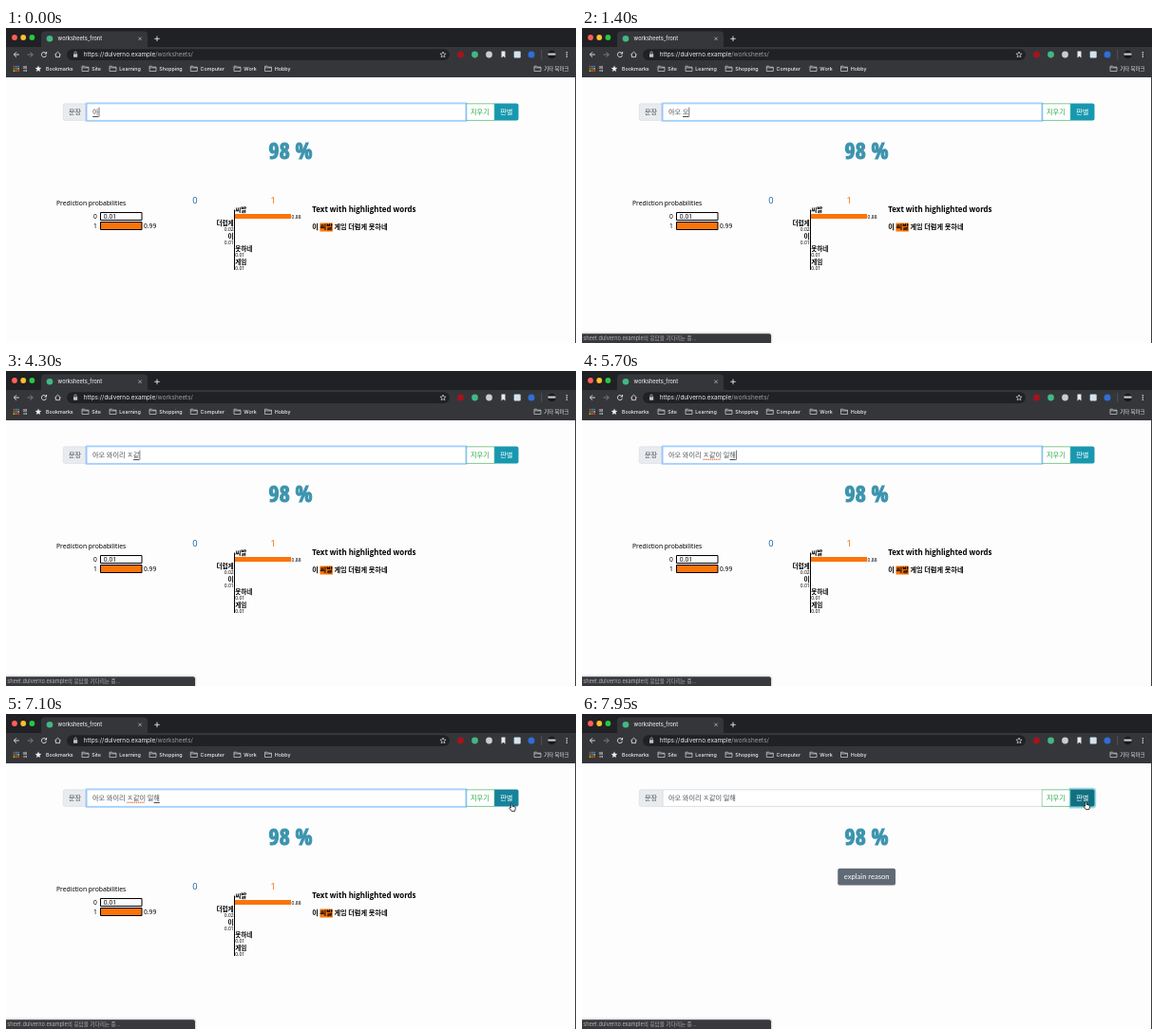
Write an HTML page with a canvas that moves like this. It is 600 px wide and 332 px high and loops after 8 s.

```html
<!DOCTYPE html>
<html lang="ko">
<head>
<meta charset="utf-8">
<title>Sentence check</title>
<style>
html, body { margin: 0; width: 100%; height: 100%; overflow: hidden; background: #fdfdfe; }
canvas { display: block; width: 600px; height: 332px; }
</style>
</head>
<body>
<canvas id="stage" width="600" height="332"></canvas>
<script>
const ctx = document.getElementById('stage').getContext('2d');
const LOOP = 8000;
const UI = "Inter, 'Noto Sans CJK KR', 'Noto Sans CJK', sans-serif";
const KO = "'Noto Sans CJK KR', 'Noto Sans CJK', 'Noto Sans', sans-serif";
const SANS = "'Noto Sans', sans-serif";
const ORANGE = '#fb7409', TEAL = '#3d94ae';

const PRESS = 7650, RESULT = 7750;
const INPUT_X = 91;
const HEAD = '아오 와이리 ';
const KEYS = [
  [0, '아'], [100, '앙'], [500, '아오'], [1100, '아오 '], [1200, '아오 ㅇ'],
  [1400, '아오 오'], [1450, '아오 와'], [1600, '아오 왕'], [1700, '아오 와이'],
  [1850, '아오 와일'], [1900, '아오 와이리'], [3050, HEAD], [3750, HEAD + 'ㅈ'],
  [4100, HEAD + 'ㅈㄱ'], [4200, HEAD + 'ㅈ가'], [4300, HEAD + 'ㅈ같'],
  [4550, HEAD + 'ㅈ같ㅇ'], [4600, HEAD + 'ㅈ같이'], [4800, HEAD + 'ㅈ같이 '],
  [4950, HEAD + 'ㅈ같이 ㅇ'], [5000, HEAD + 'ㅈ같이 이'], [5150, HEAD + 'ㅈ같이 일'],
  [5350, HEAD + 'ㅈ같이 잃'], [5600, HEAD + 'ㅈ같이 일해']
];
const SPELLCHECK = 4800;

const progress = (t, from, to) => Math.min(1, Math.max(0, (t - from) / (to - from)));
const smooth = p => p * p * (3 - 2 * p);
const lerp = (a, b, p) => a + (b - a) * p;
const mix = (a, b, p) => `rgba(${a.map((v, i) => lerp(v, b[i], p)).join()})`;

function rect(x, y, w, h, color) {
  ctx.fillStyle = color;
  ctx.fillRect(x, y, w, h);
}

function box(x, y, w, h, radii, fill, stroke, width = 0.5) {
  ctx.beginPath();
  ctx.roundRect(x, y, w, h, radii);
  if (fill) { ctx.fillStyle = fill; ctx.fill(); }
  if (stroke) { ctx.strokeStyle = stroke; ctx.lineWidth = width; ctx.stroke(); }
}

function dot(x, y, r, color) {
  ctx.beginPath();
  ctx.arc(x, y, r, 0, Math.PI * 2);
  ctx.fillStyle = color;
  ctx.fill();
}

function path(d, x, y, stroke, fill, width = 0.9) {
  const shape = new Path2D(d);
  ctx.save();
  ctx.translate(x, y);
  if (fill) { ctx.fillStyle = fill; ctx.fill(shape); }
  if (stroke) { ctx.strokeStyle = stroke; ctx.lineWidth = width; ctx.stroke(shape); }
  ctx.restore();
}

function text(str, x, y, font, color, align = 'left') {
  ctx.font = font;
  ctx.fillStyle = color;
  ctx.textAlign = align;
  ctx.fillText(str, x, y);
}

function star(x, y, r, fill, stroke) {
  ctx.beginPath();
  for (let i = 0; i < 10; i++) {
    const a = i * Math.PI / 5 - Math.PI / 2;
    const d = i % 2 ? r * 0.45 : r;
    ctx.lineTo(x + d * Math.cos(a), y + d * Math.sin(a));
  }
  ctx.closePath();
  if (fill) { ctx.fillStyle = fill; ctx.fill(); }
  if (stroke) { ctx.strokeStyle = stroke; ctx.lineWidth = 0.7; ctx.stroke(); }
}

function drawTabs() {
  rect(0, 0, 600, 21, '#202124');
  ['#ff5f57', '#febc2e', '#28c840'].forEach((c, i) => dot(9 + i * 9.2, 10, 2.9, c));
  box(37, 3.5, 112, 20, 4, '#35363a');
  dot(46, 11.2, 3.3, '#41b883');
  text('worksheets_front', 54.6, 13.3, '500 5.6px ' + UI, '#e4e6e9');
  path('M-1.7-1.7L1.7 1.7M1.7-1.7L-1.7 1.7', 141, 11.3, '#c4c7cb', null, 0.7);
  path('M-2.7 0H2.7M0-2.7V2.7', 159, 11.3, '#e8eaed');
}

function drawToolbar() {
  rect(0, 20, 600, 32, '#35363a');
  path('M2.8 0H-2.6M0-2.7L-2.7 0L0 2.7', 11, 28, '#e8eaed');
  path('M-2.8 0H2.6M0-2.7L2.7 0L0 2.7', 25.5, 28, '#85888c');
  path('M2.3-1.2A2.6 2.6 0 1 0 2.5 .8M2.6-3V-.9H.5', 40, 28, '#e8eaed');
  path('M-3.2 .2L0-2.8L3.2 .2M-2.1-.5V2.6H2.1V-.5', 54.5, 28, '#e8eaed', null, 0.8);

  box(64, 22.3, 403, 11.6, 5.8, '#202124');
  box(71, 27.2, 4.2, 3.5, 0.5, '#c0c3c7');
  path('M-1.2 0V-1.2A1.2 1.2 0 0 1 1.2-1.2V0', 73.1, 27.3, '#c0c3c7', null, 0.7);
  const font = '6.4px ' + UI;
  const host = 'https://dulverno.example';
  text(host, 81.7, 30.3, font, '#e8eaed');
  text('/worksheets/', 81.7 + ctx.measureText(host).width, 30.3, font, '#9aa0a6');
  star(460, 28.2, 3.2, null, '#d5d7da');

  dot(478.5, 28, 3.5, '#a3151c');
  dot(493.5, 28, 3.4, '#41b883');
  dot(508.5, 28, 3.4, '#c9cdd0');
  path('M-2-3.4H2V3.4L0 1.7L-2 3.4Z', 523.5, 28, null, '#e8eaed');
  box(534.7, 24.6, 7, 7, 1, '#d2e3ee');
  dot(553, 28, 3.5, '#2f6fd6');
  rect(563.5, 23, 0.6, 10, '#606266');
  dot(574.5, 28, 4.3, '#17181a');
  rect(570.5, 26.5, 8, 2.2, '#c6c7c6');
  for (let i = -1; i < 2; i++) dot(590.3, 28 + i * 2.3, 0.75, '#e8eaed');
}

function drawBookmarks() {
  const font = '500 5.35px ' + UI, ink = '#eceef0', y = 44.8;
  const colors = ['#ea4335', '#fbbc04', '#34a853', '#4285f4'];
  for (let i = 0; i < 9; i++) {
    rect(7.7 + i % 3 * 2.3, 39.8 + Math.floor(i / 3) * 2.3, 1.6, 1.6, colors[(i * 3 + (i >> 1)) % 4]);
  }
  text('앱', 17.5, y, font, ink);
  star(34, 43.1, 3.5, ink);
  text('Bookmarks', 42, y, font, ink);
  const folders = [['Site', 80], ['Learning', 109], ['Shopping', 151], ['Computer', 194.3],
    ['Work', 240], ['Hobby', 272.5], ['기타 북마크', 556]];
  for (const [label, x] of folders) {
    path('M0-2.6H2.6L3.5-1.6H7V2.7H0ZM0-.9H7', x, 42.8, '#d3d5d8', null, 0.7);
    text(label, x + 10.3, y, font, ink);
  }
}

function drawField(t) {
  const font = '7.2px ' + KO;
  const blur = progress(t, PRESS, PRESS + 150);
  const hover = progress(t, 6950, 7100);
  const base = 91.1;

  box(60.2, 79.8, 25, 17.6, [2, 0, 0, 2], '#e9ecef', '#ced4da');
  text('문장', 66, base, font, '#495057');
  box(484, 79.8, 30.2, 17.6, 0, '#fff', '#28a745', 0.6);
  text('지우기', 489, base, font, '#28a745');

  const ring = 1 - blur;
  if (ring) box(84.5, 79.2, 400, 18.8, 0.5, null, `rgba(0,123,255,${0.27 * ring})`, 2);
  box(85.1, 79.8, 398.8, 17.6, 0, '#fff', mix([206, 212, 218, 1], [128, 189, 255, 1], ring), 0.7);

  if (blur) box(514, 79, 26, 19.2, [0, 2.5, 2.5, 0], null, `rgba(58,176,195,${0.5 * blur})`, 2.4);
  const idle = [24, 152, 175, 1], dark = [21, 131, 154, 1], pressed = [16, 112, 128, 1];
  const fill = blur ? mix(dark, pressed, blur) : mix(idle, dark, hover);
  box(514.2, 79.6, 25.3, 18, [0, 2, 2, 0], fill);
  text('판별', 520.2, base, font, '#fff');

  const [keyTime, typed] = KEYS.findLast(key => key[0] <= t);
  text(typed, INPUT_X, base, font, '#495057');
  if (t >= PRESS) return;

  const widthOf = s => ctx.measureText(s).width;
  const end = INPUT_X + widthOf(typed);
  if (!typed.endsWith(' ')) {
    const start = INPUT_X + widthOf(typed.slice(0, -1));
    rect(start + 0.2, 93, end - start - 0.4, 0.9, '#33383d');
  }
  if (t >= SPELLCHECK) {
    const start = INPUT_X + widthOf(HEAD);
    for (let x = start + 0.6; x < start + 19.5; x += 1.9) dot(x, 93.3, 0.7, '#ee6b35');
  }
  if (Math.floor((t - keyTime) / 500) % 2 === 0) rect(end + 0.1, 83.6, 0.6, 10, '#202428');
}

function drawScore() {
  const fontAt = size => `800 condensed ${size}px 'Open Sans Condensed', 'Roboto Condensed', 'Open Sans', sans-serif`;
  ctx.font = fontAt(28);
  const size = Math.min(28, 28 * 46 / ctx.measureText('98 %').width);
  const baseline = 129.2 + size * 0.36;
  text('98 %', 299.6, baseline, fontAt(size), TEAL, 'center');
  ctx.strokeStyle = TEAL;
  ctx.lineWidth = 1.1;
  ctx.strokeText('98 %', 299.6, baseline);
}

function drawExplanation() {
  const ink = '#000', label = '500 6.7px ' + SANS, tiny = '5px ' + SANS, ko = '600 6.6px ' + KO;
  text('Prediction probabilities', 53, 186.7, '500 6.75px ' + SANS, ink);
  text('0', 95.8, 200.8, label, ink, 'right');
  text('1', 95.8, 211.2, label, ink, 'right');
  box(99.5, 194.5, 43.5, 8, 0, '#fafbfd', ink, 1);
  box(99.5, 204.5, 43.5, 8, 0, ORANGE, ink, 1);
  text('0.01', 102.8, 200.8, label, ink);
  text('0.99', 145, 211.2, label, ink);

  text('0', 199, 184.6, '500 9.3px ' + SANS, '#1b6cab', 'center');
  text('1', 281.2, 184.6, '500 9.3px ' + SANS, ORANGE, 'center');
  rect(240, 196, 60, 5, ORANGE);
  text('0.88', 300.6, 200.5, tiny, ink);
  rect(240, 191.5, 1, 63.5, ink);
  text('씨발', 241.2, 194.2, ko, ink);
  const words = [['더럽게', '0.02', 208, -1], ['이', '0.01', 221.6, -1],
    ['못하네', '0.01', 235.2, 1], ['게임', '0.01', 248.8, 1]];
  for (const [word, weight, y, side] of words) {
    const align = side < 0 ? 'right' : 'left';
    const x = side < 0 ? 239.6 : 241.2;
    text(word, x, y, ko, ink, align);
    text(weight, x, y + 6.2, tiny, ink, align);
  }

  text('Text with highlighted words', 322.3, 194, "700 7.9px 'Open Sans', sans-serif", ink);
  rect(330.5, 205.5, 13.4, 9, ORANGE);
  text('이 씨발 게임 더럽게 못하네', 322.3, 211.8, '600 7.2px ' + KO, ink);
}

function drawReasonButton() {
  box(269.2, 162.8, 60.8, 17.8, 2, '#606a74');
  text('explain reason', 299.7, 174.2, '7.6px Lato, sans-serif', '#fff', 'center');
}

function drawStatus(t) {
  ctx.save();
  ctx.globalAlpha = progress(t, 450, 550);
  ctx.shadowColor = 'rgba(0,0,0,.35)';
  ctx.shadowBlur = 3;
  box(-1, 322.3, 200, 11, [0, 2, 0, 0], '#38393d');
  ctx.shadowColor = 'transparent';
  text('sheet.dulverno.example의 응답을 기다리는 중…', 1.3, 329.1, '5.6px ' + UI, '#b2b5b9');
  ctx.restore();
}

function drawPointer(t) {
  if (t < 6250) return;
  const move = smooth(progress(t, 6250, 7030));
  const settle = smooth(progress(t, 7100, 7300));
  const x = lerp(440, 532.2, move) - settle * 1.8;
  const y = lerp(127, 94.2, move) - settle * 1.8;
  if (x > 514 && y < 98) {
    path('M-.8 .6Q0-.6 .8 .6V3L3.6 3.8Q4.4 4.2 4.1 5.3L3.4 8.2H0L-2.2 5.2Q-2.3 4.2-1.3 4.4L-.8 4.9Z',
      x, y, '#111', '#fff', 0.8);
  } else {
    path('M0 0V8L1.9 6.3L3.1 9L4.4 8.4L3.2 5.8H5.7Z', x, y, '#fff', '#111', 0.6);
  }
}

function draw() {
  const t = performance.now() % LOOP;
  rect(0, 0, 600, 332, '#fdfdfe');
  drawTabs();
  drawToolbar();
  drawBookmarks();
  rect(599, 52, 1, 280, '#3c3d40');
  drawField(t);
  drawScore();
  if (t < RESULT) drawExplanation();
  else drawReasonButton();
  drawStatus(t);
  drawPointer(t);
  requestAnimationFrame(draw);
}
draw();
</script>
</body>
</html>
```
